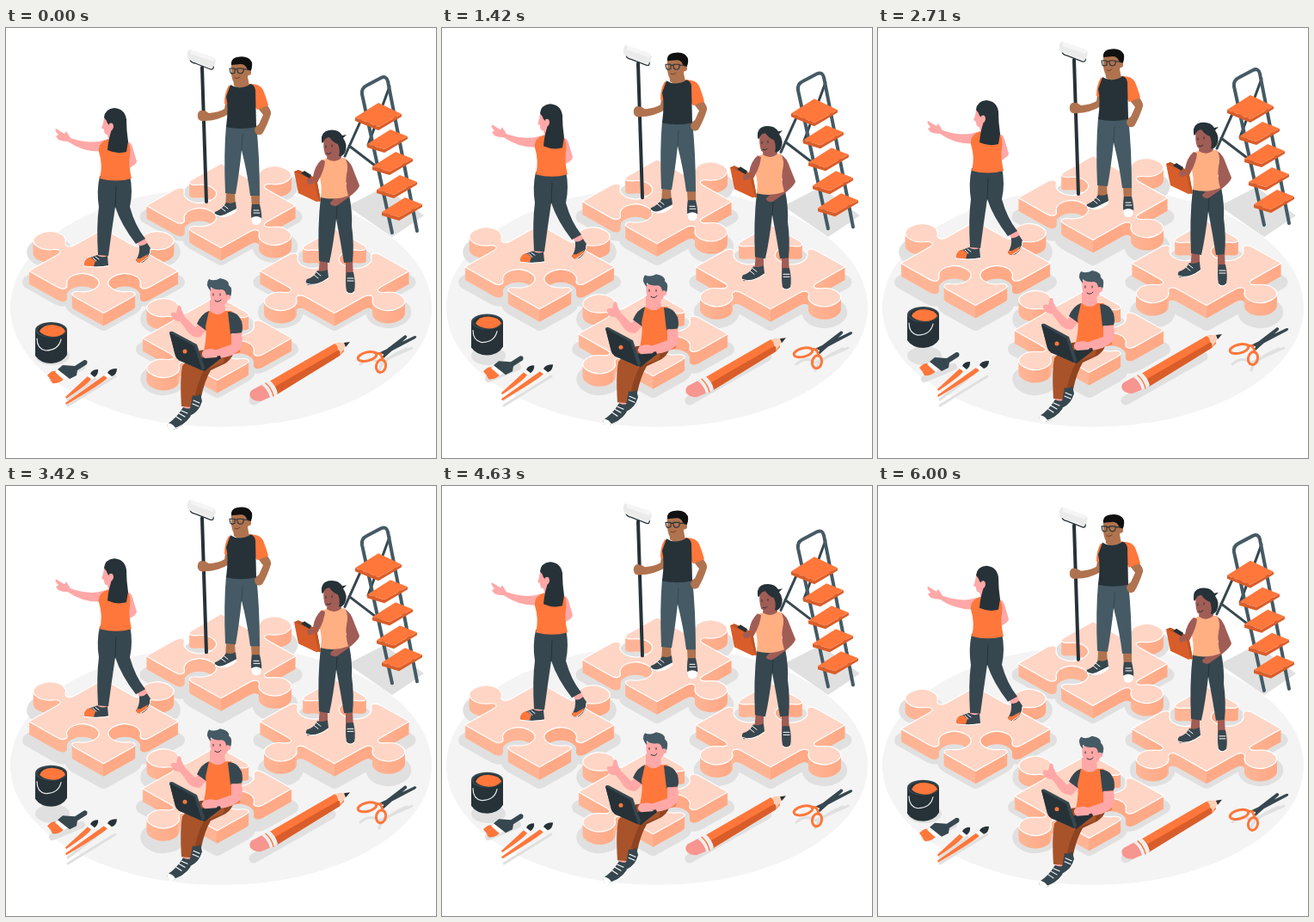
Recreate the animation shown at these times as an HTML page. Size 500x500 px, loop 6.04 s.

```html
<!DOCTYPE html>
<html lang="en">
<head>
<meta charset="utf-8">
<title>Team puzzle</title>
<style>
html, body { margin: 0; width: 100%; height: 100%; overflow: hidden; background: #fff; }
svg { display: block; width: 100vw; height: 100vh; }
.o { fill: #ff773b } .oD { fill: #d95d2a } .d { fill: #37474f } .k { fill: #263238 } .b { fill: #455a64 }
.w { fill: #fff } .p { fill: #ffa8a7 } .m { fill: #b0734f } .n { fill: #a05d56 } .r { fill: #8f4420 }
.l { fill: none; stroke-linecap: round; stroke-linejoin: round }
.sh { fill: #e0e0e0 } .shl { stroke: #e0e0e0 }
.face { fill: #ffd5c5; stroke: #fff; stroke-width: 1.2; stroke-linejoin: round }
</style>
</head>
<body>
<svg viewBox="0 0 500 500">
<defs id="defs"></defs>
<ellipse cx="250" cy="325" rx="245" ry="139" fill="#f4f4f4"/>
<g id="shadows">
  <path class="sh" d="M397 207 440 185 486 218 449 243Z"/>
  <ellipse class="sh" cx="54" cy="381" rx="20" ry="11"/>
  <path class="l shl" stroke-width="11" d="M288 433 378 382"/>
  <path class="l shl" stroke-width="3" d="M412 391q11-10 22-2l38-17M434 398q2-12 32-25"/>
  <path class="l shl" stroke-width="8" d="M54 408 88 394"/>
  <path class="l shl" stroke-width="3" d="M72 432 104 408M72 439 127 405"/>
</g>

<g id="scene">
  <g id="ladder">
    <path class="l" stroke="#37474f" stroke-width="3" d="M416 100 394 149M399 137 437 166M446 68 421 136"/>
    <path class="l" stroke="#455a64" stroke-width="4" d="M449 238 414 77Q413 70 419 67L436 58Q442 55 444 62L478 236"/>
    <g id="steps"></g>
  </g>

  <g id="mid"></g>
  <g id="painter">
    <path class="l" stroke="#263238" stroke-width="4" d="M228 46 233 202"/>
    <path class="l" stroke="#263238" stroke-width="1.3" d="M214 36Q214 40 220 41L238 48Q242 49 241 43"/>
    <path d="M214 25 241 34Q245 37 243 42 241 47 237 46L213 37Q210 34 211 29 212 25 214 25Z" fill="#ebebeb"/>
    <path d="M215 25 241 34Q243 36 241 39L215 30Z" fill="#f5f5f5"/>
    <path class="m" d="M256 82 263 88 261 99Q246 108 231 108 224 109 223 104 222 98 226 96 231 95 236 99 248 98 254 94Z"/>
    <path class="m" d="M256 192h10l1 16-12 2zM285 194h10v18h-9z"/>
    <path class="b" d="M256 113 291 113Q295 150 295 195H284Q281 170 274 142 271 170 267 193L255 192Q253 146 256 113Z"/>
    <path class="l" stroke="#37474f" stroke-width="1" d="M275 124 274 142"/>
    <path class="d" d="M256 203Q262 205 267 202L268 210Q262 218 248 220 240 219 243 214 251 211 256 203Z"/>
    <path class="w" d="M242 215Q247 220 254 217L268 210V213Q258 223 243 219Z"/>
    <path class="l" stroke="#fff" stroke-width="1" d="M250 209l5 4M253 206l5 4"/>
    <path class="d" d="M286 205H295Q298 217 297 224 293 229 286 226 284 215 286 205Z"/>
    <path class="w" d="M285 221Q291 217 297 221 298 228 291 229 285 229 285 221Z"/>
    <path class="l" stroke="#fff" stroke-width="1" d="M288 212h6M288 215h7"/>
    <path class="m" d="M292 87 303 89Q309 96 308 100 304 113 298 123 291 127 289 119 289 115 294 112L299 101 292 92Z"/>
    <path class="o" d="M259 67Q254 75 254 88L262 91 265 69ZM282 65Q295 64 299 72 303 82 305 90L292 95 284 83Z"/>
    <path class="m" d="M264 56 280 52 283 67Q273 73 265 67Z"/>
    <path class="k" d="M261 66Q267 70 274 69 281 68 284 65 289 66 290 72L291 115Q273 119 256 115 259 92 256 80Z"/>
    <path class="m" d="M262 42Q271 36 281 43 284 57 278 61 270 67 264 62 261 55 262 42Z"/>
    <path fill="#111" d="M262 43Q261 36 268 34 282 31 286 40 287 47 283 53L280 47Q278 42 273 42Z"/>
    <circle class="m" cx="282" cy="52" r="3"/>
    <path class="l" stroke="#263238" stroke-width="1.1" d="M260 47h6v5q-3 2-5 0zM269 47h7q1 5-3 6-4 0-4-4zM266 48h3M276 48l6 0"/>
    <path class="l" stroke="#6d3b2a" stroke-width=".9" d="M266 58q3 2 6-1"/>
  </g>

  <g id="left"></g>
  <g id="pointer">
    <path class="p" d="M108 258h10v12h-11zM152 247l9-4 5 11-9 5z"/>
    <path class="d" d="M109 172 144 171Q148 190 144 208 150 230 162 245L151 251Q134 229 127 208 123 235 119 265L107 264Q105 230 108 208 105 190 109 172Z"/>
    <path class="l" stroke="#263238" stroke-width="1" d="M128 184 127 208"/>
    <path class="d" d="M106 264Q111 268 118 265L119 276Q108 279 92 277 90 272 95 268Z"/>
    <path class="o" d="M91 273Q93 267 99 267L104 271 102 277H92Z"/>
    <path class="l" stroke="#fff" stroke-width="1" d="M91 277q14 2 28 0M101 267l4 4M104 266l4 3"/>
    <path class="d" d="M155 253Q160 254 164 250L168 256Q169 265 160 272 154 275 151 270 156 263 155 253Z"/>
    <path class="o" d="M156 268 165 263Q164 270 155 273 150 272 152 268Z"/>
    <path class="l" stroke="#fff" stroke-width="1" d="M168 257q1 9-12 16"/>
    <path class="p" d="M115 130Q99 136 75 128L70 120 68 123 58 117Q56 119 61 124L58 126 61 130Q66 132 72 132 92 146 117 143Z"/>
    <path class="p" d="M138 132Q145 131 147 138L152 155Q152 159 141 164L138 158 143 154 139 144Z"/>
    <path class="o" d="M113 132Q119 127 127 129L140 130Q146 136 144 149 142 158 146 175 128 180 109 175 113 160 108 144Q107 136 113 132Z"/>
    <path class="p" d="M114 104Q113 113 111 116L114 118Q114 124 118 124L120 133 129 130 130 103Z"/>
    <path class="k" d="M114 104Q115 94 126 93 138 94 140 106 140 119 142 132L140 144Q129 147 118 142 119 130 122 121L124 113Q118 114 117 108Z"/>
    <path class="p" d="M120 111q5-2 5 4-1 5-4 4z"/>
  </g>

  <g id="right"></g>
  <g id="planner">
    <path class="n" d="M365 268h9v18l-11 3zM395 270h8l1 22-9-2z"/>
    <path class="d" d="M366 196 399 194Q403 214 402 230 405 252 403 272L393 273Q389 248 384 222 381 250 376 273L364 271Q362 232 366 196Z"/>
    <path class="l" stroke="#263238" stroke-width="1" d="M385 207 384 222"/>
    <path class="d" d="M362 282Q368 284 374 281L375 290Q364 299 351 299 347 296 350 292 358 290 362 282ZM396 284H404Q407 297 405 306 400 311 396 306 394 295 396 284Z"/>
    <path class="l" stroke="#fff" stroke-width="1" d="M349 297q11 5 26-6M358 287l5 4M361 284l5 4M396 307q4 4 9 0M397 291h7M397 294h7"/>
    <path class="n" d="M394 152Q401 155 405 168L411 183Q410 190 384 207 377 207 377 203L394 186 396 181 390 169Z"/>
    <path fill="#ffaf82" d="M366 155Q371 151 379 152L394 151Q399 159 396 170 394 182 398 195 383 201 366 197 368 183 364 171Z"/>
    <path class="n" d="M367 153Q359 160 357 173L348 178 351 184Q362 183 364 176 370 165 371 155Z"/>
    <path class="oD" d="M335 167 340 165 361 175 366 201 361 202 340 192Z"/>
    <path fill="#bd5525" d="M335 167 340 165 361 175 366 201 364 202 358 177Z"/>
    <path class="k" d="M343 169l4-3 8 5-2 4z"/>
    <path class="n" d="M350 176q8-4 10 1l-3 4-6 1z"/>
    <path class="n" d="M374 143 389 142 390 151Q382 158 373 152Z"/>
    <path class="n" d="M370 127Q377 122 387 129 391 143 385 149 376 153 371 147 368 138 370 127Z"/>
    <path class="k" d="M367 131Q366 121 375 119 386 117 391 125L396 124 392 128Q398 136 394 145 391 150 387 149 389 142 386 135 380 133 376 127 371 127 369 133 367 135 367 131Z"/>
    <path class="l" stroke="#263238" stroke-width="1" d="M372 137v2M379 136v2M373 146q3 2 5-1"/>
  </g>

  <g id="front"></g>
  <g id="coder">
    <path class="p" d="M207 434l10-2-1 14-10 2zM217 420h9v12h-8z"/>
    <path class="r" d="M225 375 262 371Q268 381 255 390L238 398Q231 410 227 429L216 428 219 399Z"/>
    <path fill="#a9532a" d="M211 386Q226 376 247 379 257 382 252 390L230 398Q221 415 217 441L204 440Q202 409 205 393Z"/>
    <path class="d" d="M217 427Q223 429 226 425L228 434Q225 446 215 451 210 449 214 443Z"/>
    <path class="d" d="M206 441Q212 444 216 441L215 452Q206 464 194 467 186 467 188 460 198 454 206 441Z"/>
    <path class="w" d="M188 459Q194 460 197 465L193 468Q186 467 188 459Z"/>
    <path class="l" stroke="#fff" stroke-width="1.1" d="M191 467q16-3 24-15M198 452l6 4M201 448l7 4M204 445l7 3M215 451q11-6 13-15M218 433l7 3M217 437l7 3"/>
    <path class="p" d="M225 344 234 350 226 359Q215 362 207 347L202 341Q193 341 192 334 191 329 198 331L200 323Q204 322 204 328L208 336 214 342 220 348Z"/>
    <path class="d" d="M236 329Q227 332 222 344L233 352 242 335Z"/>
    <path class="o" d="M236 329 262 329Q273 341 274 354L272 377Q251 385 230 376 234 357 232 347Z"/>
    <path class="p" d="M237 316 254 318 255 329Q246 337 237 329Z"/>
    <path class="d" d="M258 330Q269 329 274 341 276 350 274 354L261 356Z"/>
    <path class="p" d="M262 355H274Q276 366 273 373 264 383 246 384L230 383Q225 378 231 374L245 374 262 368Z"/>
    <path class="p" d="M238 303Q247 298 259 303 261 317 254 322 246 326 240 320 236 312 238 303Z"/>
    <path class="b" d="M238 306Q231 298 236 292 242 295 249 291 260 293 259 299 265 303 260 315L256 312Q256 304 250 304 243 305 238 301Z"/>
    <circle class="p" cx="258" cy="313" r="3"/>
    <path class="l" stroke="#263238" stroke-width="1" d="M241 309v2M249 309v2M243 317q4 3 7-1"/>
    <path class="k" d="M224 384 249 381 250 384 231 399 200 386Z"/>
    <path class="d" d="M190 354Q191 352 194 353L222 368 231 394Q231 398 227 398L201 386Q198 384 197 381Z"/>
    <path class="k" d="M190 354 219 370 228 398 201 386Q198 384 197 381Z"/>
    <circle class="o" cx="208" cy="376" r="2.5"/>
    <path class="p" d="M228 379q3-7 12-6l8 3-3 7-14 1z"/>
  </g>

  <g id="pencil">
    <path class="o" d="M306 411 382 367 391 366 393 376 388 381 315 426Z"/>
    <path class="oD" d="M311 418 389 373 391 376 388 381 315 426Z"/>
    <path fill="#ffcfb5" d="M382 367 398 365 388 381Q390 376 386 374 386 369 382 367Z"/>
    <path class="k" d="M393 366 400 365 395 371Z"/>
    <path fill="#f7958f" d="M286 421 299 414 308 429 296 434Q287 434 284 429 282 424 286 421Z"/>
    <path fill="#eee" d="M297 415 307 410Q314 416 316 425L307 430Q305 420 297 415Z"/>
    <path class="l" stroke="#ff773b" stroke-width="1.4" d="M302 413q7 6 9 15"/>
  </g>
  <g id="scissors">
    <path class="d" d="M434 380 464 357Q468 358 465 361L439 384ZM433 378 475 358Q479 358 476 361L438 381Z"/>
    <g class="l" stroke="#ff773b" stroke-width="3">
      <ellipse cx="420" cy="382" rx="11" ry="5" transform="rotate(-14 420 382)"/>
      <ellipse cx="436" cy="393" rx="5.5" ry="7.5" transform="rotate(12 436 393)"/>
      <path d="M430 378 436 379 438 386"/>
    </g>
    <circle class="w" cx="438" cy="380" r="1"/>
  </g>
  <g id="brushes">
    <path class="o" d="M48 404Q53 398 58 399L68 407Q63 414 54 413 52 408 48 404Z"/>
    <path class="w" d="M57 400 63 396 73 405 67 409Z"/>
    <path class="d" d="M60 397 66 392 80 393 91 386Q96 386 94 391L83 398 82 404 74 408Z"/>
    <path class="o" d="M69 429 95 405 99 408Q97 413 70 431ZM69 436 114 404 118 407Q111 414 70 438Z"/>
    <path class="w" d="M95 405l4-3 4 3-4 3zM114 404l4-3 4 3-4 3z"/>
    <path class="k" d="M98 402Q100 397 107 397 108 402 103 406ZM118 401Q120 396 129 396 129 403 123 405Z"/>
  </g>
</g>

<g id="bucket">
  <path class="k" d="M34 351V381Q40 390 53 390 66 389 71 380V351Z"/>
  <ellipse class="d" cx="52.5" cy="351" rx="18.5" ry="9"/>
  <ellipse class="k" cx="53" cy="351.5" rx="16.5" ry="7.4"/>
  <path class="o" d="M39 353Q42 345 54 345 67 346 69 353 64 359 54 359 43 358 39 353Z"/>
  <path class="l" stroke="#e8e8e8" stroke-width="1.2" d="M36 361Q36 373 46 375 61 375 64 362"/>
</g>
</svg>

<script>
const $ = id => document.getElementById(id);
const LOOP = 6040, RISE = 10, THICK = 15;
const LEFT = '#ffb595', RIGHT = '#ffa986';

// Tab outline along one side: distance along the side, distance outward
const TAB = [[.38, 0], [.47, 0], [.46, .06], [.42, .09], [.3, .17], [.33, .37], [.5, .37],
             [.67, .37], [.7, .17], [.58, .09], [.54, .06], [.53, 0], [.62, 0]];

function outline(cx, cy, tabs) {
  const at = (p, q) => `${(cx - 87 + 87 * (p + q)).toFixed(1)} ${(cy + 49 * (p - q)).toFixed(1)} `;
  let path = 'M' + at(0, 0), p = 0, q = 0, dp = 1, dq = 0;
  for (const tab of tabs) {
    const pts = TAB.map(([a, h]) => at(p + dp * a + dq * h * tab, q + dq * a - dp * h * tab));
    path += 'L' + pts[0] + 'C' + pts.slice(1).join('');
    p += dp; q += dq;
    path += 'L' + at(p, q);
    [dp, dq] = [-dq, dp];
  }
  return path + 'Z';
}

// Tabs run from the lower left side anticlockwise: 1 sticks out, -1 cuts in
function piece(id, cx, cy, tabs) {
  const stops = [[-87, LEFT]];
  if (tabs[0] > 0) stops.push([-79, LEFT], [-46, RIGHT], [-46, LEFT]);
  stops.push([0, LEFT], [0, RIGHT]);
  if (tabs[1] > 0) stops.push([44, RIGHT], [44, LEFT], [79, RIGHT]);
  const d = outline(cx, cy, tabs);
  $('defs').innerHTML += `<path id="${id}Top" d="${d}"/>
    <linearGradient id="${id}Side" gradientUnits="userSpaceOnUse" x1="0" x2="500">${
      stops.map(([x, c]) => `<stop offset="${(cx + x) / 500}" stop-color="${c}"/>`).join('')}</linearGradient>`;
  let body = '';
  for (let y = THICK; y > 0; y--) body += `<use href="#${id}Top" y="${y}" fill="url(#${id}Side)"/>`;
  $(id).innerHTML = body + `<use href="#${id}Top" class="face"/>`;
  $('shadows').innerHTML += `<path class="sh shl" stroke-width="15" stroke-linejoin="round" transform="translate(0 13)" d="${d}"/>`;
}

piece('mid', 250, 206.5, [-1, 1, 1, -1]);
piece('left', 113.5, 282.5, [-1, -1, 1, 1]);
piece('right', 382, 282.5, [1, 1, -1, -1]);
piece('front', 245.5, 360.5, [1, -1, -1, 1]);

const step = (x, y, a, b) =>
  `<path class="oD" d="M${x} ${y}l${a} ${b} 27-15v3l-27 16-${a}-${b}z"/>
   <path class="o" d="M${x} ${y}l27-17 ${a} ${b + 2}-27 15z"/>`;
$('steps').innerHTML = step(406, 104, 27, 11) +
  [[420, 135], [426, 161], [431, 188], [437, 214]].map(([x, y]) => step(x, y, 20, 6)).join('');

function draw(now) {
  const t = now % LOOP / LOOP;
  const lift = RISE * (1 - Math.abs(1 - 2 * t));
  $('scene').setAttribute('transform', `translate(0 ${-lift})`);
  $('bucket').setAttribute('transform', `translate(0 ${-2 * lift})`);
}

let start;
function tick(now) {
  start ??= now;
  draw(now - start);
  requestAnimationFrame(tick);
}
draw(0);
requestAnimationFrame(tick);
</script>
</body>
</html>
```
